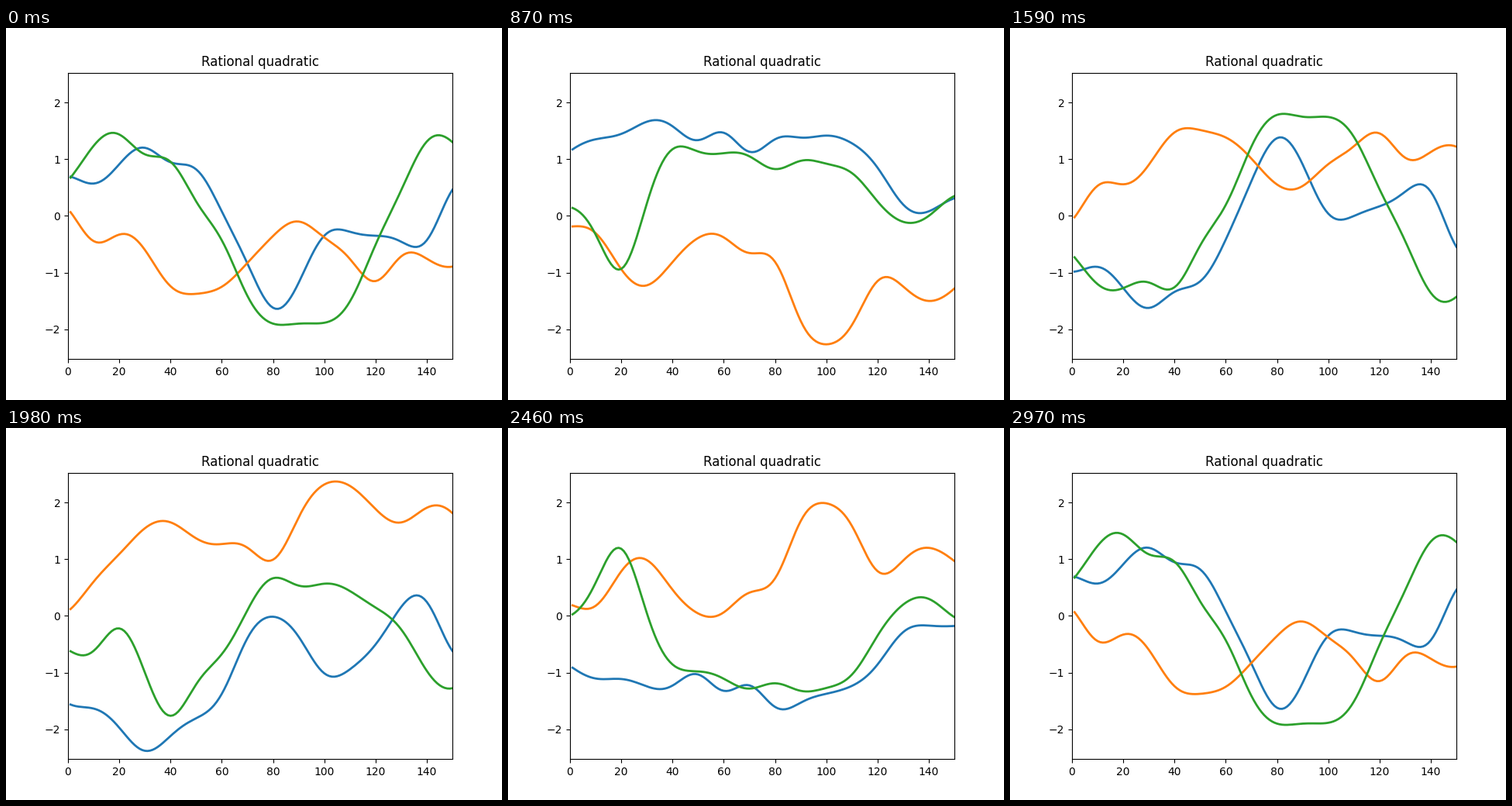
A matplotlib script that plays this animation: 640x480 px, repeating every 3000 ms.

```python
import numpy as np
import matplotlib.pyplot as plt
from matplotlib.animation import FuncAnimation

FRAMES = 100
INTERVAL = 30
PHASE = 2 * np.pi * 29 / 99  # angle between the two key poses

x = np.arange(1, 151)
knots = np.arange(0, 151, 10)


def kernel(p, q, scale=12.0, alpha=1.0):
    """Rational quadratic covariance."""
    d2 = np.subtract.outer(p, q) ** 2
    return (1 + d2 / (2 * alpha * scale ** 2)) ** -alpha


gram = kernel(knots, knots) + 1e-5 * np.eye(len(knots))
weights = kernel(x, knots) @ np.linalg.inv(gram)


def curve(*heights):
    """Mean of the Gaussian process that passes through the key heights."""
    return weights @ np.array(heights)


# Two key poses per process: blue, orange, green.
poses = [
    (curve(.70, .57, .91, 1.20, .945, .82, .08, -.84,
           -1.62, -1.18, -.35, -.28, -.35, -.455, -.43, .46),
     curve(1.14, 1.35, 1.445, 1.66, 1.58, 1.335, 1.465, 1.13,
           1.35, 1.38, 1.415, 1.28, .85, .2, .08, .31)),
    (curve(.12, -.445, -.33, -.60, -1.24, -1.375, -1.25, -.83,
           -.355, -.10, -.38, -.76, -1.15, -.715, -.755, -.895),
     curve(-.19, -.305, -.94, -1.225, -.815, -.39, -.38, -.655,
           -.81, -1.85, -2.265, -1.925, -1.15, -1.245, -1.50, -1.28)),
    (curve(.62, 1.235, 1.435, 1.085, .955, .255, -.43, -1.41,
           -1.90, -1.90, -1.885, -1.51, -.51, .45, 1.31, 1.30),
     curve(.155, -.33, -.935, .22, 1.175, 1.135, 1.105, 1.05,
           .825, .97, .92, .755, .255, -.105, 0, .35)),
]

fig, ax = plt.subplots(figsize=(6.4, 4.8), dpi=100)
ax.set_title("Rational quadratic")
ax.set_xlim(0, 150)
ax.set_ylim(-2.525, 2.525)
lines = [ax.plot(x, start, lw=2)[0] for start, _ in poses]


def update(i):
    # Walk once around the great circle through both poses.
    t = 2 * np.pi * i / (FRAMES - 1)
    u, v = np.sin([PHASE - t, t]) / np.sin(PHASE)
    for line, (p, q) in zip(lines, poses):
        line.set_ydata(u * p + v * q)
    return lines


anim = FuncAnimation(fig, update, frames=FRAMES, interval=INTERVAL,
                     repeat=True, repeat_delay=0)
plt.show()
```
